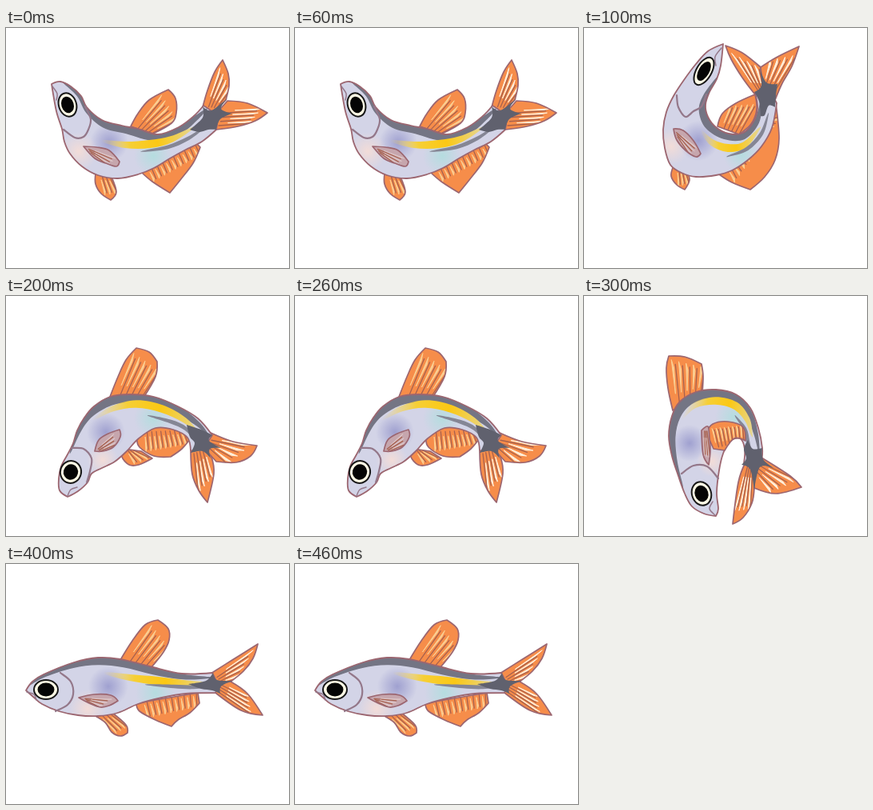
An HTML page with a canvas for the animation above (0.5 s loop, 354 by 300 pixels).

```html
<!DOCTYPE html>
<html lang="en">
<head>
<meta charset="utf-8">
<title>Fish</title>
<style>
html, body { margin: 0; width: 100%; height: 100%; overflow: hidden; background: #fff; }
canvas { display: block; }
</style>
</head>
<body>
<canvas id="stage" width="354" height="300"></canvas>
<script>
const ctx = document.getElementById('stage').getContext('2d');
const STEP = 100;
const EDGE = '#9c6670', ORANGE = '#f68d4a', CREAM = '#fbcf92', PALE = '#fff0dc';
const GREY = '#747584', DARK = '#60616e';

// Outlines are smooth curves through "x,y" points; "!" marks a corner.
// Fins: [outline, root segment + tip segment, ray count]
const straight = {
  tail: [
    ['256,137! 283,120 315,100! 309,118 297,134 281,147! 262,152!', '262,139 270,149 316,100 290,143', 4],
    ['262,150! 281,147! 302,162 321,189! 294,183 262,161!', '272,149 264,159 305,163 310,190', 4]],
  fins: [
    ['143,120! 158,96 174,76 190,70! 203,81 204,95 197,110 182,129!', '148,121 182,129 182,70 207,104', 5],
    ['163,174! 167,184 187,195 207,203! 215,195 230,186 242,174! 240,161!', '168,171 238,160 174,195 239,180', 9],
    ['108,188! 124,198 132,210 143,215 152,211! 150,201 133,186!', '113,188 130,187 137,215 153,205', 3]],
  body: '25,158! 33,147 47,138 85,123 115,117 143,119 180,128 220,137 258,136! 264,150 262,161! 225,162 195,167 165,175 140,186 115,190 90,189 66,184 45,175 34,166',
  back: '29,151 48,138 82,125 115,120 148,123 185,133 222,141 254,142',
  line: '122,136 155,142 190,146 222,149 252,149',
  under: '178,151 210,153 235,154 258,152',
  mark: '228,150! 250,146 259,136! 264,145 283,146! 269,153 268,162! 258,158 244,156',
  tint: [[128, 153, 25], [187, 161, 25], [102, 181, 24]],
  gill: ['68,136 81,147 84,163 77,176 62,184', '26,160 35,163 38,170'],
  pec: ['91,167! 110,163 131,164 140,171! 129,177 118,179 104,174', '98,167 101,171 138,167 119,180', 3],
  eye: [50, 157, 15, 12, 0]
};

const rise = {
  tail: [
    ['246,99! 252,78 261,55 271,40! 278,57 279,72 275,90! 257,108!', '250,98 264,100 267,42 282,75', 4],
    ['262,108! 277,91! 302,94 327,106! 312,116 290,123 263,127!', '276,101 266,122 325,98 308,119', 4]],
  fins: [
    ['156,123! 165,107 179,90 203,77! 212,88 213,106 207,119 184,132!', '160,125 184,131 195,77 217,114', 5],
    ['169,180! 183,192 205,206! 218,190 234,169 243,149! 238,144!', '175,178 237,146 182,195 243,160', 9],
    ['112,182! 112,195 119,207 131,215! 138,205 132,186!', '115,183 130,186 121,211 140,208', 3]],
  body: '57,70! 68,67 81,73 94,85 101,99 120,115 145,122 165,126 190,133 216,124 235,110 247,97! 263,110 263,127! 245,142 225,152 205,163 185,175 165,183 140,188 115,184 95,173 80,157 73,142 70,126 63,104',
  back: '72,68 91,83 104,103 124,119 152,126 186,135 216,128 237,113 250,102',
  line: '119,141 149,146 180,145 207,139 234,125',
  under: '172,154 202,149 228,138 250,123',
  mark: '230,127! 246,112 246,98! 257,103 277,88! 269,101 283,107! 268,114 263,127! 253,127 242,130',
  tint: [[129, 143, 24], [184, 160, 24], [91, 154, 24]],
  gill: ['99,98 106,114 103,127 97,136 86,137 72,127', '58,73 64,82 63,90'],
  pec: ['97,148! 113,149 129,153 142,167! 138,173 125,169 111,163', '102,149 106,156 141,162 130,173', 3],
  eye: [77, 96, 11, 15, -.3]
};

const curl = {
  tail: [
    ['213,82! 198,62 184,39 177,22! 198,31 221,49! 228,83!', '217,82 225,76 177,25 218,47', 4],
    ['224,82! 221,49! 242,36 269,23! 260,48 248,69 239,90!', '224,70 237,82 228,39 268,30', 4]],
  fins: [
    ['167,123! 173,107 190,94 214,83! 216,102 209,120 194,133!', '170,125 194,133 180,96 217,92', 5],
    ['169,183! 185,193 208,202! 226,186 239,165 244,138 240,94! 225,130!', '177,178 230,115 186,199 248,110', 10],
    ['112,172! 109,185 116,196 126,202! 132,190 128,177!', '115,175 127,179 115,200 132,196', 3]],
  body: '174,20! 155,29 140,45 125,65 112,85 103,105 99,127 101,150 108,171 122,181 140,186 165,184 185,178 205,165 222,148 235,125 241,94! 230,78 214,81! 217,100 212,117 199,131 181,132 165,124 155,111 152,96 157,80 166,64 171,47',
  back: '165,64 152,86 149,103 157,121 177,133 199,134 216,117 222,91',
  line: '146,128 160,143 180,150 201,146 219,126',
  under: '181,160 204,151 222,132 230,109',
  mark: '221,110! 219,92 213,80! 222,72 220,50! 228,68 242,70! 240,85 239,99! 231,97 226,109',
  tint: [[143, 141, 25], [197, 158, 23], [109, 148, 23]],
  gill: ['153,83 147,98 137,104 127,111 118,99 116,84', '172,25 164,36 165,47'],
  pec: ['112,126! 124,128 137,141 146,157! 140,161 127,153 116,140', '115,128 117,136 146,150 134,161', 3],
  eye: [150, 54, 9.5, 19, .52]
};

const dive = {
  tail: [
    ['256,171! 284,182 314,187! 306,200 288,208 263,207! 246,188!', '258,177 254,190 314,183 279,212', 4],
    ['240,184! 257,201! 260,222 252,258! 241,243 233,223 231,195!', '250,192 235,197 262,226 241,250', 4]],
  fins: [
    ['130,126! 140,101 150,80 163,65! 179,70 189,82! 187,101 172,127!', '135,126 171,125 158,65 193,91', 5],
    ['164,178! 167,189 185,200 206,201! 220,191 230,179! 217,163 185,163!', '171,170 222,168 172,197 228,187', 9],
    ['148,191! 145,201 154,211 166,211 183,203! 169,194!', '150,193 156,191 157,213 183,204', 3]],
  body: '77,251! 67,243 66,228 69,213 77,198 84,184 89,168 98,152 110,138 130,126 155,123 185,126 215,138 240,153 258,174! 247,188 231,194! 227,177 209,167 187,165 166,178 151,194 136,207 120,215 107,222 102,233 90,244',
  back: '81,194 91,168 105,147 130,131 157,127 187,131 216,143 240,160 253,174',
  line: '108,155 133,141 163,135 195,141 223,155 243,174',
  under: '180,150 206,157 225,166 239,183',
  mark: '226,161! 244,167 258,174! 254,181 269,190! 255,191 256,203! 246,194 231,196! 236,184 230,176',
  tint: [[125, 170, 24], [184, 153, 24], [121, 205, 20]],
  gill: ['82,190 97,191 107,203 105,219 101,233', '77,250 81,242 89,239'],
  pec: ['111,194! 116,180 128,172 142,167! 143,176 134,189 121,194', '114,190 118,194 136,168 139,185', 3],
  eye: [81, 220, 13, 14, .25]
};

const tuck = {
  tail: [
    ['202,208! 193,233 186,285! 199,277 210,259 213,240! 214,207!', '203,210 211,214 184,274 208,270', 4],
    ['213,207! 213,240! 240,247 272,239! 258,225 222,202!', '213,222 221,208 230,250 270,232', 4]],
  fins: [['111,143! 105,115 103,90 106,75! 126,76 147,85! 149,100 148,121!', '113,139 146,122 104,74 151,87', 5]],
  over: [['153,171! 161,160 180,157 199,164 202,181! 188,178 176,193! 162,191!', '164,190 200,181 157,164 198,160', 8]],
  body: '165,275! 150,272 135,263 126,247 118,225 110,200 106,175 110,150 120,132 140,120 165,117 190,123 208,140 218,165 223,190 222,207! 212,214 200,209! 201,191 195,178 182,182 174,197 169,218 166,246 168,266',
  back: '123,237 114,207 110,176 115,150 131,130 160,121 188,128 206,147 215,172 219,195',
  line: '122,154 138,137 164,131 189,137 204,154 210,174',
  under: '190,151 201,166 205,182 209,196',
  mark: '205,180! 211,191 223,190! 224,204 237,215! 220,214 213,243! 208,217 197,211! 203,203 200,191',
  tint: [[132, 184, 23], [187, 151, 23], [160, 207, 19]],
  gill: ['122,222 137,212 154,213 168,228', '164,274 157,266 161,257'],
  pec: ['147,168! 155,163 157,178 158,194 156,211! 149,198', '149,169 154,169 149,202 158,205', 3],
  eye: [147, 247, 12, 15, -.3]
};

const poses = [rise, curl, dive, tuck, straight];

const parse = s => s.split(' ').map(p => {
  const [x, y] = p.split(',').map(parseFloat);
  return { x, y, corner: p.endsWith('!') };
});
const mix = (a, b, t) => ({ x: a.x + (b.x - a.x) * t, y: a.y + (b.y - a.y) * t });

function curve(pts, closed) {
  const path = new Path2D(), n = pts.length;
  const at = i => closed ? pts[(i + n) % n] : pts[Math.max(0, Math.min(n - 1, i))];
  const handle = (i, dir) => {
    const p = at(i), k = p.corner ? 0 : dir / 6;
    return [p.x + (at(i + 1).x - at(i - 1).x) * k, p.y + (at(i + 1).y - at(i - 1).y) * k];
  };
  path.moveTo(pts[0].x, pts[0].y);
  for (let i = 0; i < (closed ? n : n - 1); i++) {
    path.bezierCurveTo(...handle(i, 1), ...handle(i + 1, -1), at(i + 1).x, at(i + 1).y);
  }
  if (closed) path.closePath();
  return path;
}

// A band along a spine that thins out towards both ends.
function ribbon(spine, width) {
  const pts = parse(spine), n = pts.length;
  const side = s => pts.map((p, i) => {
    const a = pts[Math.max(0, i - 1)], b = pts[Math.min(n - 1, i + 1)];
    const len = Math.hypot(b.x - a.x, b.y - a.y);
    const w = s * width / 2 * Math.sin(Math.PI * (i + .35) / (n - .3));
    return { x: p.x - (b.y - a.y) / len * w, y: p.y + (b.x - a.x) / len * w };
  });
  return curve([...side(1), ...side(-1).reverse()], true);
}

function stroke(path, color, width) {
  ctx.strokeStyle = color;
  ctx.lineWidth = width;
  ctx.stroke(path);
}

function fill(path, color) {
  ctx.fillStyle = color;
  ctx.fill(path);
}

function fin([outline, frame, count], light = CREAM, color = ORANGE) {
  const path = curve(parse(outline), true);
  const [r0, r1, t0, t1] = parse(frame);
  fill(path, color);
  ctx.save();
  ctx.clip(path);
  for (let i = 0; i < count; i++) {
    const t = (i + .5) / count, root = mix(r0, r1, t), tip = mix(t0, t1, t);
    const a = mix(root, tip, .25), b = mix(root, tip, .93);
    const m = mix(root, mix(t0, t1, t + .28 / count), .78);
    const wedge = new Path2D(`M${a.x} ${a.y}L${b.x} ${b.y}L${m.x} ${m.y}Z`);
    fill(wedge, light);
    stroke(wedge, light, 1);
    const u = (i + 1) / count, s = mix(r0, r1, u), e = mix(s, mix(t0, t1, u), .85);
    stroke(new Path2D(`M${s.x} ${s.y}L${e.x} ${e.y}`), '#a7614e', 1.3);
  }
  ctx.restore();
  stroke(path, EDGE, 1.7);
}

function glow([x, y, r], rgb, alpha) {
  const g = ctx.createRadialGradient(x, y, 0, x, y, r);
  g.addColorStop(0, `rgba(${rgb},${alpha})`);
  g.addColorStop(1, `rgba(${rgb},0)`);
  ctx.fillStyle = g;
  ctx.fillRect(x - r, y - r, 2 * r, 2 * r);
}

function stripe(spine) {
  const pts = parse(spine), a = pts[0], b = pts[pts.length - 1];
  const g = ctx.createLinearGradient(a.x, a.y, b.x, b.y);
  g.addColorStop(0, 'rgba(246,214,100,0)');
  g.addColorStop(.3, '#f6cf35');
  g.addColorStop(.6, '#fbc814');
  g.addColorStop(1, '#e5d693');
  fill(ribbon(spine, 10), g);
}

function eye([x, y, rx, ry, turn]) {
  const oval = k => {
    const p = new Path2D();
    p.ellipse(x, y, rx * k, ry * k, turn, 0, 2 * Math.PI);
    return p;
  };
  fill(oval(1), '#fffbe6');
  stroke(oval(1), '#181818', 2);
  fill(oval(.7), '#050505');
}

function draw(pose) {
  const body = curve(parse(pose.body), true);
  ctx.fillStyle = '#fff';
  ctx.fillRect(0, 0, 354, 300);
  ctx.lineCap = ctx.lineJoin = 'round';
  pose.tail.forEach(f => fin(f, PALE));
  pose.fins.forEach(f => fin(f));

  fill(body, '#d3d4e7');
  ctx.save();
  ctx.clip(body);
  const [shade, teal, peach] = pose.tint;
  glow(shade, '142,143,200', .75);
  glow(teal, '176,222,222', .85);
  glow(peach, '250,222,212', .8);
  fill(ribbon(pose.back, 13), GREY);
  stripe(pose.line);
  fill(ribbon(pose.under, 5), '#858695');
  ctx.restore();
  stroke(body, EDGE, 1.8);
  fill(curve(parse(pose.mark), true), DARK);

  (pose.over || []).forEach(f => fin(f));
  pose.gill.forEach((g, i) => stroke(curve(parse(g)), '#94788a', i ? 1.5 : 2.2));
  fin(pose.pec, '#dcc4c6', '#c6a6ad');
  eye(pose.eye);
}

let shown = -1;
function tick() {
  const i = Math.floor(performance.now() / STEP) % poses.length;
  if (i !== shown) draw(poses[shown = i]);
  requestAnimationFrame(tick);
}
tick();
</script>
</body>
</html>
```
